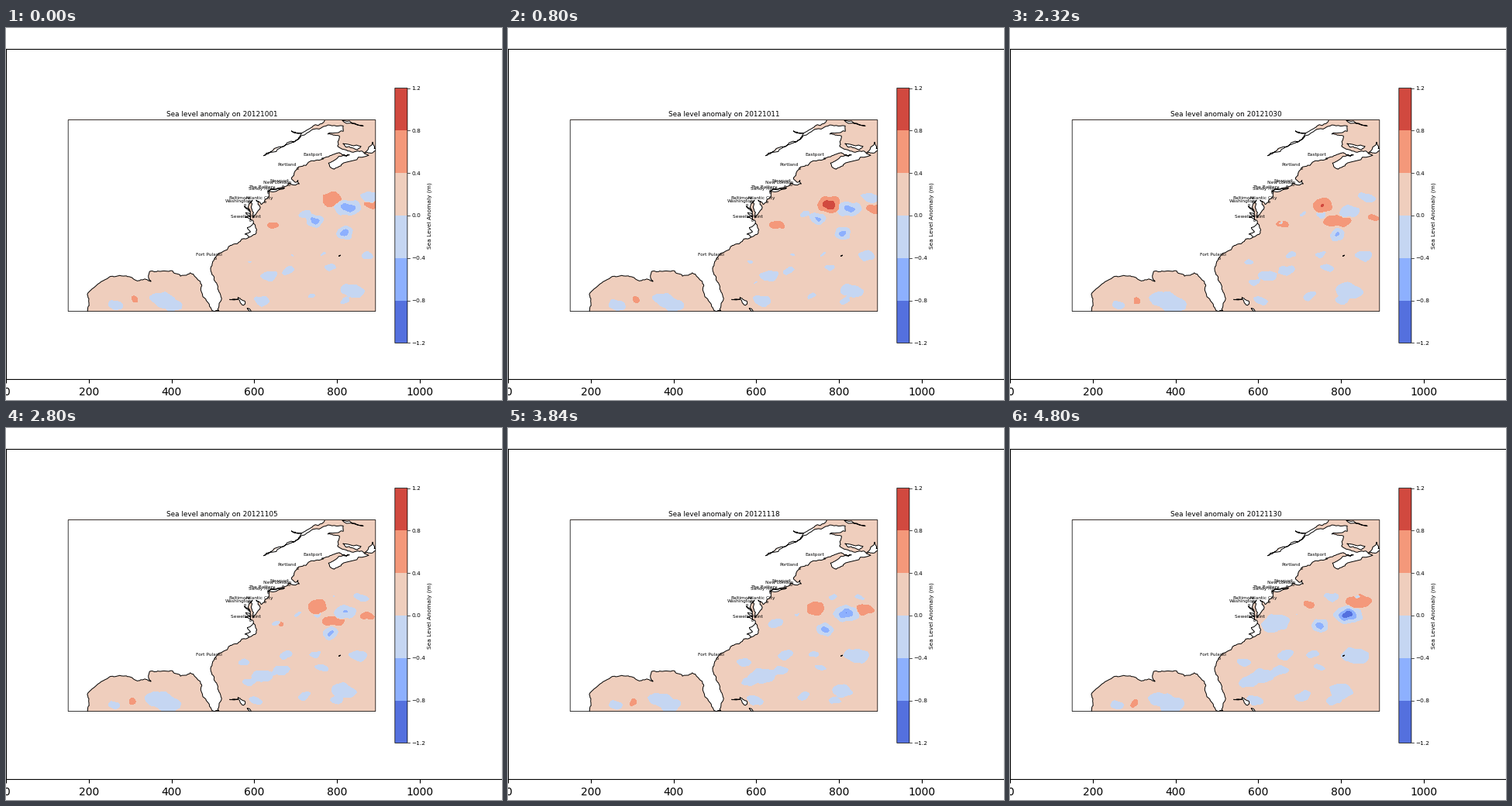
A matplotlib script for the animation above (4880 ms loop, 640 by 480 pixels).

```python
import numpy as np
import matplotlib.pyplot as plt
from matplotlib.animation import FuncAnimation
from matplotlib.patches import Rectangle

W, H, DAYS = 640, 480, 61
PT = 8 / 15                                # the inner chart is drawn at this scale
WEST, NORTH, COLS, ROWS = -99.875, 49.875, 39.75, 24.75
LEFT, TOP, MAP_W = 80.2, 118.6, 396.6
DEG = MAP_W / COLS
MAP_H = ROWS * DEG
LEVELS = np.linspace(-1.2, 1.2, 7)
SHADES = plt.get_cmap("coolwarm")((np.arange(6) + 0.5) / 6)
rng = np.random.default_rng(4)

# Key points of the coast (lon, lat); finer detail comes from roughen()
GULF = [(-97.4, 24.8), (-97.15, 25.9), (-97.4, 27.3), (-96.2, 28.5), (-94.75, 29.4),
        (-93.2, 29.77), (-91.8, 29.55), (-90.9, 29.05), (-89.9, 29.3), (-89.15, 29.0),
        (-89.5, 29.7), (-89.3, 30.3), (-88.1, 30.3), (-86.5, 30.38), (-85.35, 29.67),
        (-84.1, 30.1), (-82.8, 29), (-82.7, 27.8), (-82, 26.5), (-81.1, 25.15),
        (-80.4, 25.2), (-80.03, 26.8), (-80.55, 28.45), (-81.3, 29.9), (-81.4, 30.9),
        (-80.9, 32.03), (-79.3, 33.1), (-78.9, 33.65), (-78, 33.87), (-77.4, 34.5),
        (-76.6, 34.65), (-75.55, 35.23), (-75.55, 35.8), (-76, 36.9)]
BAYS = [(-76.3, 37), (-76.3, 38), (-76.5, 39), (-76.05, 39.5), (-76.2, 38.5),
        (-75.9, 37.9), (-75.97, 37.2), (-75.1, 38.3), (-75.1, 38.75), (-75.55, 39.5),
        (-74.9, 38.95), (-74.1, 39.75), (-74, 40.65), (-73.6, 40.95), (-71.5, 41.38),
        (-71.35, 41.7), (-71, 41.5), (-70, 41.6), (-70.15, 42.05), (-70.5, 41.8),
        (-71, 42.3), (-70.7, 42.65), (-70.6, 43.1), (-70.2, 43.66), (-69.1, 44),
        (-68.8, 44.4), (-67, 44.85), (-66.4, 45.1), (-64.8, 45.65), (-64.4, 45.35),
        (-63.5, 45.35), (-65, 45), (-66.2, 44.3), (-65.9, 43.7), (-65.5, 43.5)]
RIVER = [(-64.3, 44.3), (-61, 45.3), (-61.9, 45.85), (-63.3, 45.75), (-64.6, 46.2),
         (-65, 47.1), (-64.8, 47.8), (-66.3, 48.05), (-64.3, 48.4), (-64.3, 49.1),
         (-66.5, 49.1), (-68.5, 48.5), (-70.3, 47.3), (-71.2, 46.85), (-73.5, 45.7),
         (-74.6, 45.25), (-72.5, 46.42), (-70.5, 47.1), (-69.7, 48.15), (-71, 48.45),
         (-69.6, 48.2), (-68.2, 49.1), (-67.3, 49.35), (-66.7, 50.1)]
ESTUARY = [(-74.2, 45.3), (-70, 47.2), (-68.4, 48.5), (-68.4, 49.05), (-69.8, 48.3)]
ISLANDS = [
    [(-64.5, 49.9), (-61.7, 49.1), (-64.2, 49.6)],
    [(-64.3, 46.8), (-62, 46.45), (-62.5, 46), (-63.9, 46.35)],
    [(-61.5, 45.65), (-60.5, 47), (-60.3, 46.2), (-59.8, 45.95), (-60.6, 45.6)],
    [(-74, 40.6), (-71.9, 41.07), (-73.7, 40.87)],
    [(-78.95, 26.65), (-77.9, 26.7), (-78.4, 26.6)],
    [(-77.9, 26.9), (-77, 26.4), (-77.2, 25.9)],
    [(-76.7, 25.5), (-76.1, 24.9), (-76.3, 25.3)],
    [(-64.85, 32.28), (-64.65, 32.38), (-64.75, 32.3)],
]
INLETS = [
    [(-76.5, 34.75), (-77, 35.1), (-76.3, 35.4), (-76.7, 35.95), (-75.9, 36.5)],
    [(-76.3, 38), (-77.1, 38.7), (-76.35, 38.2)],
    [(-76.3, 37), (-77, 37.3), (-76.3, 37.4), (-76.9, 37.9), (-76.3, 37.7)],
]
CITIES = [("Eastport", -66.98, 44.9), ("Portland", -70.25, 43.66), ("Newport", -71.33, 41.5),
          ("New London", -72.09, 41.36), ("The Battery", -74.01, 40.7),
          ("Sandy Hook", -74.01, 40.47), ("Atlantic City", -74.42, 39.36),
          ("Baltimore", -76.58, 39.27), ("Washington", -77.02, 38.87),
          ("Sewells Point", -76.33, 36.95), ("Fort Pulaski", -80.9, 32.03)]

# Strong eddies: path, radii, strength; path and strength are evenly spaced in time
COLD = [
    ([(398, 249), (402, 240), (402, 240)], (11, 9), [4.8, 1.5, 0.5]),
    ([(437, 264), (422, 267), (400, 255)], (11, 9), [4.8, 3.5, 4.8]),
    ([(441, 232), (438, 237), (436, 241)], (17, 10), [5, 2.6, 6.8]),
]
WARM = [
    ([(420, 221), (412, 231), (403, 229), (399, 234), (386, 228)], (14, 10),
     [2.9, 5.6, 2.9, 2.9, 1.3]),
    ([(422, 249)], (21, 8), [0, 0, 2.9, 0, 0]),
    ([(474, 226), (474, 237), (468, 246), (462, 237), (450, 224)], (18, 9),
     [1.8, 1.6, 1.2, 1.7, 2.9]),
    ([(345, 255), (360, 250)], (13, 6), [1.6, 2.8, 1.7, 0.5, 0]),
    ([(166, 350), (161, 356)], (5, 5), [2.6]),
]
# Weak cold patches: mean place, first and last radius
PATCHES = [(437, 339, 13, 12), (427, 352, 6, 7), (323, 352, 9, 8), (386, 346, 5, 8),
           (332, 320, 8, 13), (356, 313, 7, 9), (409, 309, 6, 6), (400, 292, 3, 7),
           (456, 294, 7, 13), (363, 293, 2, 10), (308, 302, 2, 8), (314, 328, 1, 10),
           (350, 252, -8, 14), (424, 218, -5, 7), (460, 219, 11, 4), (378, 240, 6, 2),
           (140, 358, 9, 7), (199, 351, 13, 14), (214, 359, 10, 12)]
TILTS = rng.uniform(-0.5, 0.2, len(PATCHES))
PHASES = rng.uniform(0, 2 * np.pi, len(PATCHES))

X, Y = np.meshgrid(np.linspace(LEFT, LEFT + MAP_W, 320),
                   np.linspace(TOP, TOP + MAP_H, 200))
# A slight warp keeps the outlines from being plain ellipses
WX = X + 0.9 * np.sin(Y / 3.7 + X / 9) + 0.6 * np.sin(Y / 2.1)
WY = Y + 0.8 * np.sin(X / 4.1 - Y / 8) + 0.6 * np.sin(X / 2.3)


def bump(x, y, rx, ry, tilt, peak):
    c, s = np.cos(tilt), np.sin(tilt)
    dx, dy = WX - x, WY - y
    r2 = ((dx * c + dy * s) / rx) ** 2 + ((dy * c - dx * s) / ry) ** 2
    return peak * np.exp(-1.4 * r2)


def along(values, t):
    """Value at t in 0..1 of evenly spaced keys."""
    return np.interp(t, np.linspace(0, 1, len(values)), values)


def strong(eddies, t):
    for path, (rx, ry), peaks in eddies:
        x, y = (along(axis, t) for axis in zip(*path))
        yield bump(x, y, rx, ry, 0, along(peaks, t))


def weak(t):
    """Patches drift west, faster in the open ocean, and slowly pulse."""
    for (x, y, r0, r1), tilt, phase in zip(PATCHES, TILTS, PHASES):
        r = (r0 + (r1 - r0) * t) * (1 + 0.12 * np.sin(9 * t + phase))
        if r > 0.5:
            drift = 22 * (x - LEFT) / MAP_W * (0.5 - t)
            yield bump(x + drift, y, 1.5 * r, 0.9 * r, tilt, 2.9)


def union(bumps):
    return sum(b ** 4 for b in bumps) ** 0.25


def anomaly(t):
    cold = union([*strong(COLD, t), *weak(t)])
    warm = union(strong(WARM, t))
    return np.clip(0.2 + 0.2 * np.where(warm > cold, warm, -cold), -1.19, 1.19)


def to_px(points):
    lon, lat = np.asarray(points, float).T
    return np.column_stack([LEFT + (lon - WEST) * DEG, TOP + (NORTH - lat) * DEG])


def roughen(points, rounds=3):
    """Split each stretch at a randomly shifted midpoint."""
    p = to_px(points)
    for _ in range(rounds):
        step = np.diff(p, axis=0)
        size = np.minimum(np.hypot(*step.T)[:, None], 8)
        out = np.empty((2 * len(p) - 1, 2))
        out[::2] = p
        out[1::2] = p[:-1] + step / 2 + rng.normal(0, 0.1, step.shape) * size
        p = out
    return p


fig = plt.figure(figsize=(W / 100, H / 100), dpi=100, facecolor="white")
ax = fig.add_axes([0, 0, 1, 1])
ax.set(xlim=(0, W), ylim=(H, 0))
ax.axis("off")

# Outer axes around the picture
pic_h = W * 800 / 1200
outer = fig.add_axes([0, (H - pic_h) / 2 / H, 1, pic_h / H], facecolor="none")
outer.set(xlim=(-0.5, 1199.5), xticks=range(0, 1001, 200), yticks=[])


def frame(x, y, w, h):
    return ax.add_patch(Rectangle((x, y), w, h, fc="none", ec="black", lw=0.55,
                                  snap=False, zorder=5))


box = frame(LEFT, TOP, MAP_W, MAP_H)


def land(points):
    ax.fill(*points.T, fc="white", ec="none", zorder=2)[0].set_clip_path(box)


def shore(points):
    ax.plot(*points.T, color="black", lw=0.7, zorder=3)[0].set_clip_path(box)


coast = roughen(GULF + BAYS + RIVER)
land(np.vstack([coast, to_px([(-101, 50.1), (-101, 24.8)])]))
land(to_px(ESTUARY))
shore(coast)
for island in ISLANDS:
    ring = roughen(island + island[:1])
    land(ring)
    shore(ring)
for inlet in INLETS:
    shore(roughen(inlet))

for name, lon, lat in CITIES:
    (x, y), = to_px([(lon, lat)])
    ax.plot(x, y, "o", ms=1.6, mfc="none", mec="black", mew=0.4, zorder=4)
    ax.text(x - 2.5 * DEG, y - 0.3 * DEG, name, size=8 * PT, zorder=6)

title = ax.text(LEFT + MAP_W / 2, TOP - 4.4, "", size=12 * PT, ha="center")

# Colour bar
BAR_X, BAR_W, BAR_TOP, BAR_H = 501.8, 16.1, 77.5, 328.9
for i, (level, y) in enumerate(zip(LEVELS, np.linspace(BAR_TOP + BAR_H, BAR_TOP, 7))):
    if i < 6:
        ax.add_patch(Rectangle((BAR_X, y), BAR_W, -BAR_H / 6, fc=SHADES[i], ec="none"))
    right = BAR_X + BAR_W
    ax.plot([right, right + 2.6], [y, y], color="black", lw=0.5)
    label = f"{abs(level):.1f}"
    ax.text(right + 5.4, y, ("\u2212" if i < 3 else "") + label,
            size=10 * PT, va="center_baseline")
frame(BAR_X, BAR_TOP, BAR_W, BAR_H)
ax.text(547, 242, "Sea Level Anomaly (m)", size=10 * PT, rotation=90,
        ha="center", va="center")

layer = []


def draw(day):
    while layer:
        layer.pop().remove()
    layer.append(ax.contourf(X, Y, anomaly(day / (DAYS - 1)), LEVELS, colors=SHADES,
                             zorder=1))
    date = 20121001 + day if day < 31 else 20121101 + day - 31
    title.set_text(f"Sea level anomaly on {date}")
    return [title]


anim = FuncAnimation(fig, draw, frames=DAYS, interval=80, repeat=True, repeat_delay=0)
plt.show()
```
